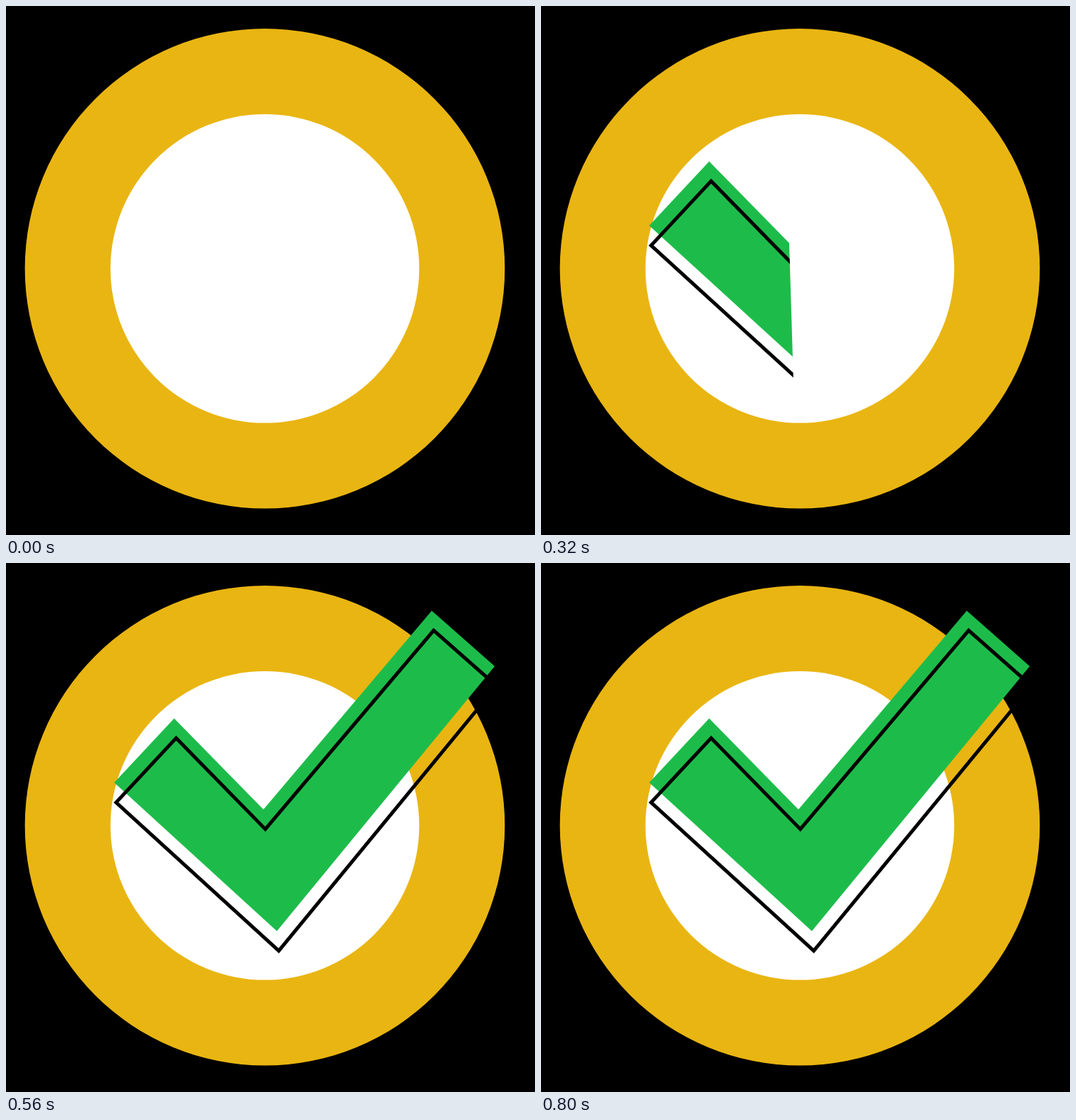
An HTML page with a canvas that plays this animation: 748x748 px, repeating every 4.92 s.

```html
<!DOCTYPE html>
<html lang="en">
<head>
<meta charset="utf-8">
<title>Check mark</title>
<style>
  html, body { margin: 0; height: 100%; overflow: hidden; background: #000; }
  canvas { display: block; }
</style>
</head>
<body>
<canvas id="stage" width="748" height="748"></canvas>
<script>
const ctx = document.getElementById('stage').getContext('2d');
const LOOP = 4920, STEP = 20, START = 220, WIPED = 560;
const RAD = Math.PI / 180;
const check = [[237.8, 219.7], [364, 348.5], [602, 67.5], [691, 146], [383, 520.5], [153, 310.6]];

// The wipe follows a straight lead, a bend around a pivot and a straight tail
const HEADING = 46 * RAD, TURN = 96 * RAD;
const LEAD = 36, RADIUS = 252, TAIL = 242;
const LENGTH = LEAD + RADIUS * TURN + TAIL;

const clamp = (v, lo, hi) => Math.max(lo, Math.min(hi, v));

function disc(radius, color) {
  ctx.fillStyle = color;
  ctx.beginPath();
  ctx.arc(366, 371.3, radius, 0, 2 * Math.PI);
  ctx.fill();
}

function checkPath(dx, dy) {
  ctx.beginPath();
  for (const [x, y] of check) ctx.lineTo(x + dx, y + dy);
  ctx.closePath();
}

// Keeps only what lies behind the sweeping edge
function clipWipe(t) {
  const progress = ((t - START) / (WIPED - START)) ** 0.8545;
  const bend = progress * LENGTH - LEAD;
  const shift = bend - clamp(bend, 0, RADIUS * TURN);
  ctx.save();
  ctx.translate(345.8, 168.4);
  ctx.rotate(HEADING - clamp(bend / RADIUS, 0, TURN));
  ctx.beginPath();
  ctx.rect(shift - 2000, -2000, 2000, 4000);
  ctx.restore();
  ctx.clip();
}

function drawCheck(t) {
  const swell = clamp(Math.min((t - 620) / 60, (800 - t) / 80), 0, 1);
  const scale = 1 + 0.04 * swell;
  ctx.save();
  if (t < WIPED) clipWipe(t);
  ctx.translate(366, 367);
  ctx.scale(scale, scale);
  ctx.translate(-366, -367);
  checkPath(0, 0);
  ctx.fillStyle = '#1dbc4a';
  ctx.fill();
  checkPath(2.7, 27.9);
  ctx.lineWidth = 5;
  ctx.strokeStyle = '#000';
  ctx.stroke();
  ctx.restore();
}

function draw(now) {
  const t = Math.floor(now % LOOP / STEP) * STEP;
  ctx.fillStyle = '#000';
  ctx.fillRect(0, 0, 748, 748);
  disc(339.3, '#e9b512');
  disc(218.3, '#fff');
  if (t >= START) drawCheck(t);
}

const begin = performance.now();
function tick() {
  draw(performance.now() - begin);
  requestAnimationFrame(tick);
}
tick();
</script>
</body>
</html>
```
